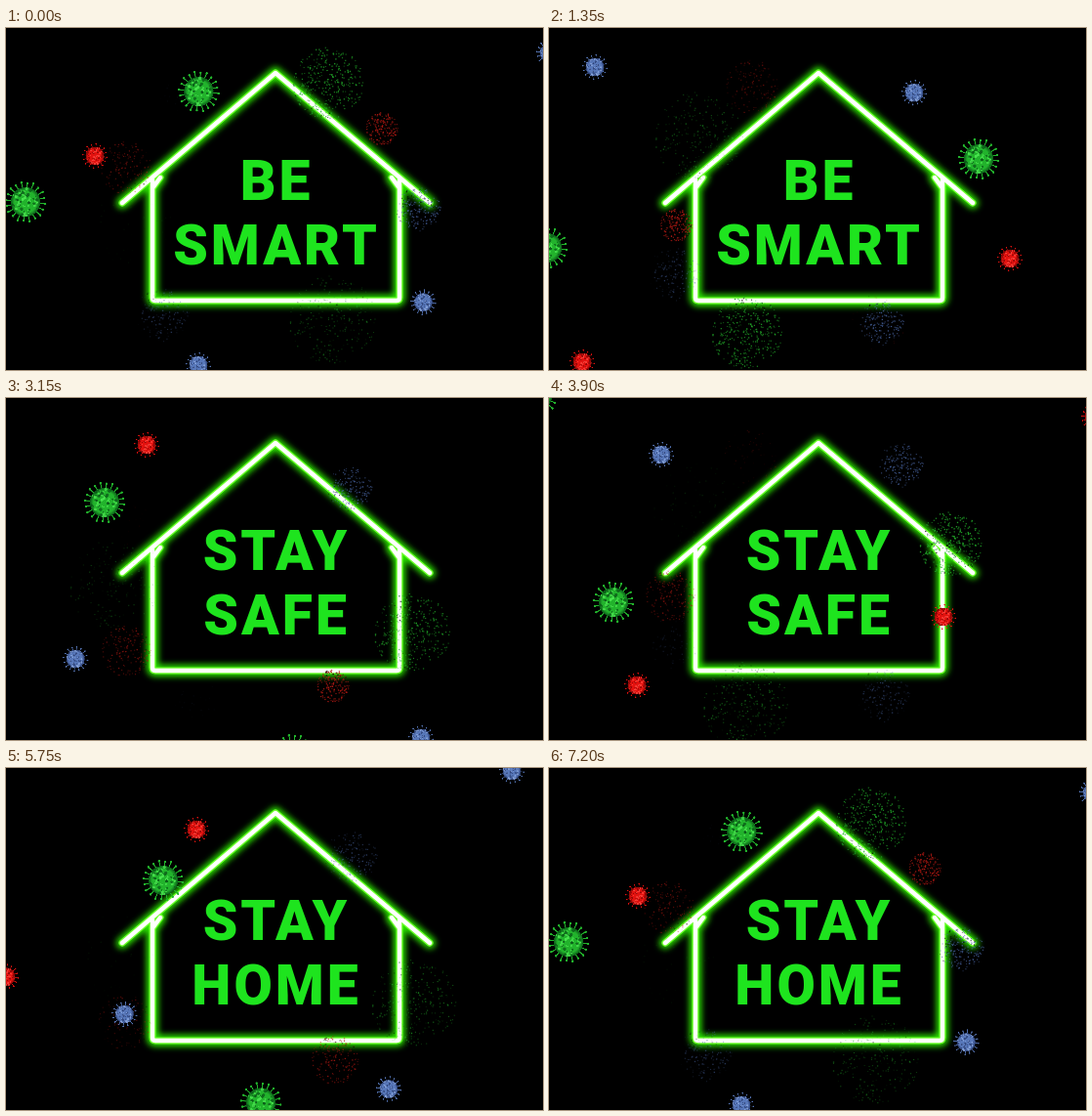
These frames come from a looping animation (550x350 px, 7250 ms). An HTML page with a canvas:

```html
<!DOCTYPE html>
<html lang="en">
<head>
<meta charset="utf-8">
<title>Stay home</title>
<style>
  html, body { margin: 0; width: 100%; height: 100%; overflow: hidden; background: #000; }
  svg, canvas { position: absolute; left: 0; top: 0; width: 550px; height: 350px; }
  text { font: 900 57px Roboto, "Open Sans", sans-serif; letter-spacing: 3px; fill: #1ee41e; text-anchor: middle; }
</style>
</head>
<body>
<svg viewBox="0 0 550 350">
  <defs>
    <filter id="glow" x="0" y="0" width="550" height="350" filterUnits="userSpaceOnUse">
      <feGaussianBlur stdDeviation="3.2"/>
    </filter>
    <filter id="soft" x="0" y="0" width="550" height="350" filterUnits="userSpaceOnUse">
      <feGaussianBlur stdDeviation="0.7"/>
    </filter>
    <path id="house" d="M119 179 L276 46 L434 179 M150 155 V276 Q150 279 153 279 H400 Q403 279 403 276 V155 M150 164 L158 153 M403 164 L395 153"/>
  </defs>
  <g fill="none" stroke-linecap="round" stroke-linejoin="round">
    <use href="#house" stroke="#2be800" stroke-width="12" filter="url(#glow)"/>
    <use href="#house" stroke="#6dff2c" stroke-width="7" filter="url(#soft)"/>
    <use href="#house" stroke="#fff" stroke-width="4.4" filter="url(#soft)"/>
  </g>
  <text id="top" x="277" y="176"></text>
  <text id="bottom" x="277" y="242"></text>
</svg>
<canvas id="stage" width="550" height="350"></canvas>
<script>
const LOOP = 7250, STEP = 50, CYCLE = 48, FADE = 14;
const TAU = Math.PI * 2;
const ctx = document.getElementById('stage').getContext('2d');
const topLine = document.getElementById('top');
const bottomLine = document.getElementById('bottom');
const slogans = [['BE', 'SMART'], ['DON’T', 'PANIC'], ['STAY', 'SAFE'], ['STAY', 'HOME']];

// Each path: impact step, impact x, y, velocity x, y per step.
const kinds = [
  { size: 21, dots: 430, spikes: 20, light: '#4be650', mid: '#22b32c', dark: '#0b5a18', dust: '#25b52d',
    paths: [
      [50, 222, 73, 12.3, 4], [45, 327, 62, -12, 8], [54, 122, 190, 17, 2],
      [40, 330, 290, -5, -17], [29, 406, 150, -17, 8], [35, 134, 193, 17, -4],
      [24, 206, 305, -11, -7.5], [19, 161, 115, 20, 2.7], [12, 408, 236, -16, 2]] },
  { size: 13, dots: 230, spikes: 16, light: '#ff4a42', mid: '#e3120f', dark: '#7c0505', dust: '#b01a14',
    paths: [
      [47, 382, 104.5, -11, 5.3], [51, 145, 140, 18, 3], [42, 132, 145, 15, 4],
      [34, 132, 258, 14, -12], [31, 404, 224, -17, -3], [26, 133, 201, 19, -1.8],
      [20, 212, 68, 17, 5], [15, 333, 292, -4, -16], [11, 132, 254, 17, -4]] },
  { size: 13, dots: 210, spikes: 16, light: '#8ca8de', mid: '#5878ba', dark: '#2b3e70', dust: '#4a66a4',
    paths: [
      [45, 415, 185, -14, 0], [50, 424, 262, -1.7, -9.3], [51, 197, 300, 0, -15],
      [41, 167, 286, 8, -15], [35, 183, 76, 17, 4.5], [28, 356, 74, -18, 7.9],
      [24, 337, 296, -11, -6.5], [20, 138, 247, 16.7, -5], [13, 348, 97, -16, 5.5]] }
];

function randomizer(seed) {
  return () => {
    seed = (seed * 1664525 + 1013904223) >>> 0;
    return seed / 4294967296;
  };
}

function disc(c, x, y, r, fill) {
  c.fillStyle = fill;
  c.beginPath();
  c.arc(x, y, r, 0, TAU);
  c.fill();
}

function makeSprite(kind, random) {
  const scale = 3, half = kind.size + 2;
  const sprite = document.createElement('canvas');
  sprite.width = sprite.height = half * 2 * scale;
  const c = sprite.getContext('2d');
  c.scale(scale, scale);
  c.translate(half, half);
  const body = kind.size * 0.72, knob = kind.size * 0.055;
  c.strokeStyle = kind.mid;
  c.lineWidth = kind.size * 0.05;
  for (let i = 0; i < kind.spikes; i++) {
    const a = i / kind.spikes * TAU + 0.1, reach = kind.size * (i % 2 ? 0.92 : 0.97);
    const x = Math.cos(a) * reach, y = Math.sin(a) * reach;
    c.beginPath();
    c.moveTo(0, 0);
    c.lineTo(x, y);
    c.stroke();
    disc(c, x, y, knob, kind.mid);
  }
  const shade = c.createRadialGradient(0, 0, 0, 0, 0, body);
  shade.addColorStop(0, kind.mid);
  shade.addColorStop(0.75, kind.mid);
  shade.addColorStop(1, kind.dark);
  disc(c, 0, 0, body, shade);
  for (let i = 0; i < 70; i++) {
    const r = body * Math.sqrt(random()) * 0.95, a = random() * TAU;
    c.globalAlpha = 0.75;
    disc(c, Math.cos(a) * r, Math.sin(a) * r, kind.size * (0.03 + random() * 0.05), i % 2 ? kind.light : kind.dark);
  }
  return { sprite, half };
}

function makeDust(kind, random) {
  return Array.from({ length: kind.dots }, () => {
    const r = Math.pow(random(), 0.6), a = random() * TAU;
    return { x: Math.cos(a) * r, y: Math.sin(a) * r, life: 0.45 + random() * 0.55,
      size: 0.8 + random() * 0.6, color: random() < 0.25 ? '#020602' : kind.dust };
  });
}

kinds.forEach((kind, i) => {
  const random = randomizer(71 + i * 37);
  Object.assign(kind, makeSprite(kind, random));
  kind.dust = makeDust(kind, random);
});

function drawDust(kind, x, y, age) {
  const spread = 1 - Math.exp(-age / 3);
  const radius = kind.size * (0.9 + 1.35 * spread);
  const cx = x + (x - 276) * 0.08 * spread, cy = y + (y - 180) * 0.08 * spread;
  for (const dot of kind.dust) {
    const left = 1 - age / (FADE * dot.life);
    if (left <= 0) continue;
    ctx.globalAlpha = Math.pow(left, 0.9);
    ctx.fillStyle = dot.color;
    ctx.fillRect(cx + dot.x * radius, cy + dot.y * radius, dot.size, dot.size);
  }
  ctx.globalAlpha = 1;
}

function drawVirus(kind, [hit, x, y, vx, vy], phase) {
  const age = (phase - hit + CYCLE * 2) % CYCLE;
  if (age > 0 && age < FADE) return drawDust(kind, x, y, age);
  const lead = age === 0 ? 0 : age - CYCLE;
  if (lead < -24) return;
  const { sprite, half } = kind;
  ctx.drawImage(sprite, x + vx * lead - half, y + vy * lead - half, half * 2, half * 2);
}

function render(ms) {
  const step = Math.floor(ms % LOOP / STEP);
  const [first, second] = slogans[Math.min(3, Math.floor(step / 30))];
  topLine.textContent = first;
  bottomLine.textContent = second;
  // The middle pass skips one step.
  const skipped = step >= CYCLE && step < CYCLE * 2 - 1 ? 1 : 0;
  const phase = (step + skipped) % CYCLE;
  ctx.clearRect(0, 0, 550, 350);
  for (const kind of kinds) for (const path of kind.paths) drawVirus(kind, path, phase);
}

const start = performance.now();
function tick() {
  render(performance.now() - start);
  requestAnimationFrame(tick);
}
tick();
</script>
</body>
</html>
```
